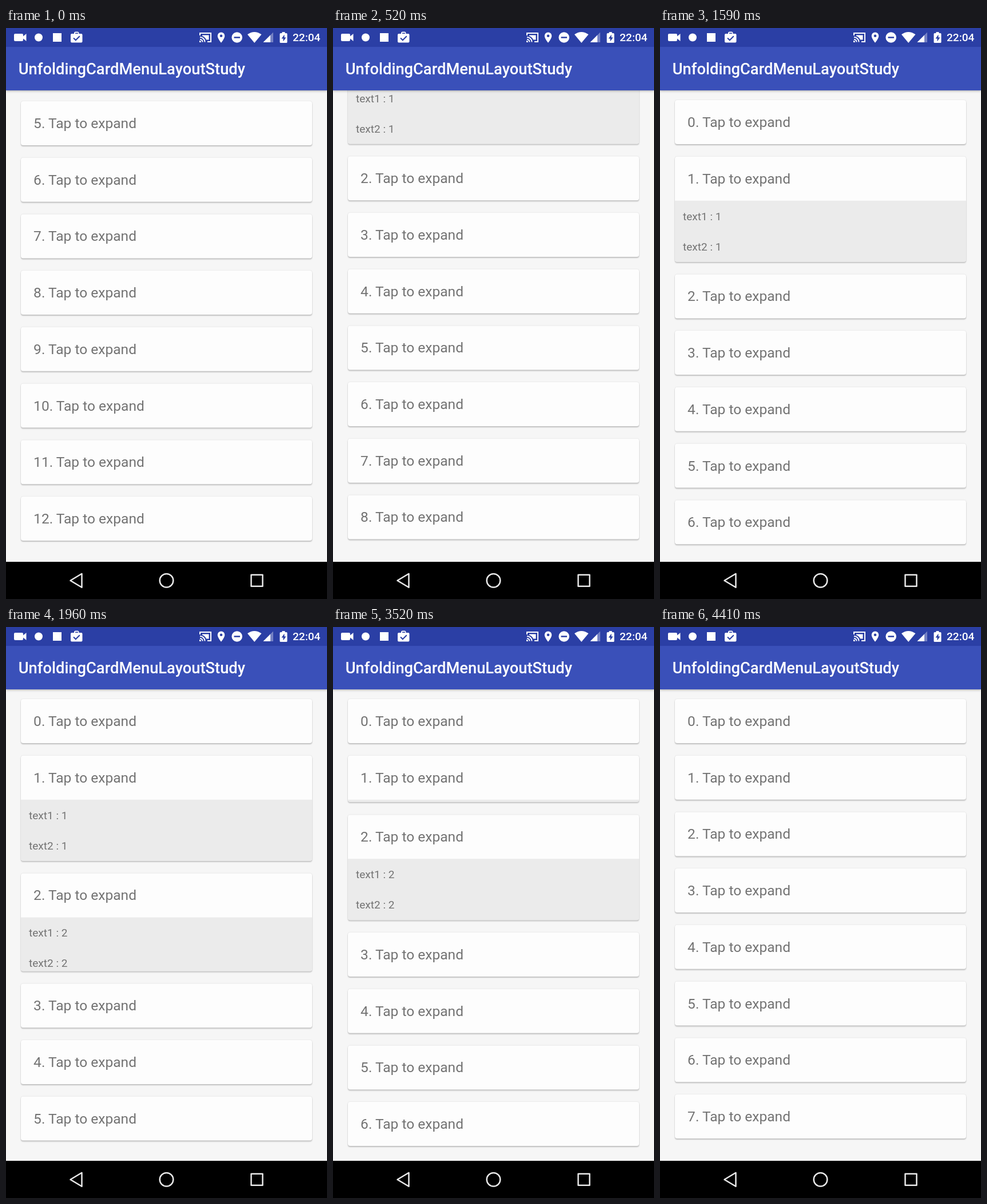
Write an HTML page that moves like this. It is 561 by 998 pixels and loops after 4450 ms.

```html
<!DOCTYPE html>
<html lang="en">
<head>
<meta charset="utf-8">
<title>Unfolding cards</title>
<style>
  html, body { margin: 0; width: 100%; height: 100%; overflow: hidden; background: #f6f6f6; }
  body { position: relative; font-family: Roboto, "Open Sans", sans-serif; }
  .bar { position: absolute; left: 0; width: 561px; }
  #status { top: 0; height: 33px; background: #2b3fa5; }
  #tools {
    top: 33px; height: 76px; background: #3a50b9; box-shadow: 0 1px 4px rgba(0, 0, 0, .32);
    color: #fff; font-size: 27.3px; font-weight: 500; line-height: 78px; text-indent: 21.8px;
    white-space: nowrap;
  }
  #nav { top: 932.5px; height: 65.5px; background: #000; }
  #clock {
    position: absolute; left: 501px; top: 0; color: #fff;
    font-size: 19.1px; font-weight: 500; line-height: 34px;
  }
  svg { position: absolute; left: 0; top: 0; }
  #list { position: absolute; left: 0; top: 109px; width: 561px; height: 801.5px; overflow: hidden; }
  .card {
    position: absolute; left: 26.3px; top: 0; width: 508.4px; border-radius: 4px;
    background: #fdfdfd; color: #737373; white-space: nowrap;
    box-shadow: 0 2px 2px rgba(0, 0, 0, .2), 0 0 2px rgba(0, 0, 0, .14);
  }
  .head { height: 76.5px; line-height: 78px; font-size: 24.54px; padding-left: 21.8px; }
  .more { height: 0; overflow: hidden; background: #ebebeb; border-radius: 0 0 4px 4px; }
  .more div { height: 53.5px; line-height: 55px; font-size: 19.1px; padding-left: 13.6px; }
</style>
</head>
<body>
<div id="list">
  <svg id="glow" width="561" height="120" style="z-index:1">
    <ellipse cx="280.5" rx="841.5" fill="#3f51b5"/>
  </svg>
</div>
<div id="tools" class="bar">UnfoldingCardMenuLayoutStudy</div>
<div id="status" class="bar">
  <svg width="561" height="33" fill="#fff">
    <path d="M16 10h12q2 0 2 2v2.6l5.500-4.600v13l-5.500-4.600v2.600q0 2-2 2h-12q-2 0-2-2v-9q0-2 2-2z"/>
    <circle cx="57" cy="16.500" r="7"/>
    <rect x="82" y="9" width="15" height="15"/>
    <path fill-rule="evenodd" d="M115 10h4v-1q0-2.500 2.500-2.500h3.500q2.500 0 2.500 2.500v1h4q2 0 2 2v11.500q0 2-2 2h-16.500q-2 0-2-2V12q0-2 2-2zm6 0h5v-1.500h-5z"/>
    <path d="M118 17.500l3.800 3.800 7-7" fill="none" stroke="#2b3fa5" stroke-width="2"/>
    <g fill="none" stroke="#fff" stroke-width="2">
      <path d="M339 13V9h19v15h-6M339 16a8.500 8.500 0 0 1 8.500 8.500M339 20a4.500 4.500 0 0 1 4.500 4.500"/>
      <path d="M343 12.500h11.500v8h-4.500q-2-5-7-6.500z" fill="#fff" stroke="none"/>
    </g>
    <path d="M338 22a3 3 0 0 1 3 3h-3z"/>
    <path fill-rule="evenodd" d="M376 7.500a6.300 6.300 0 0 1 6.300 6.300c0 4.700-6.300 12-6.300 12s-6.300-7.300-6.300-12a6.300 6.300 0 0 1 6.300-6.300zm0 4a2.300 2.300 0 1 0 .01 0z"/>
    <circle cx="403.700" cy="16.500" r="9.300"/>
    <path d="M398.500 15.300h10.500v2.500h-10.500z" fill="#2b3fa5"/>
    <path d="M422 11.300q12-8.500 24.500 0L434.200 26z"/>
    <path d="M467 7.500V25h-17.500z" opacity=".35"/>
    <path d="M462 12.500V25h-12.500z"/>
    <path d="M482.500 7h5v2h2.500q1.500 0 1.500 1.500v14q0 1.500-1.500 1.500h-10q-1.500 0-1.500-1.500v-14q0-1.500 1.500-1.500h2.500z"/>
    <path d="M486.500 11.500l-5 7h3v5l5-7h-3z" fill="#2b3fa5"/>
  </svg>
  <div id="clock">22:04</div>
</div>
<div id="nav" class="bar">
  <svg width="561" height="66" fill="none" stroke="#e9e9e9" stroke-width="2.500" stroke-linejoin="round">
    <path d="M132.500 20.800v24L112.500 32.800z"/>
    <circle cx="280.500" cy="32.800" r="11.800"/>
    <rect x="428.500" y="22.800" width="20" height="20"/>
  </svg>
</div>
<script>
const LOOP = 4450, PITCH = 98.7, FIRST = 17, BODY = 107, COUNT = 13;
const FOLD = 350, OPEN_2 = 1690, CLOSE_1 = 3219, CLOSE_2 = 3980;
const GLOW = { start: 645, grow: 215, fade: 640, height: 112.7, radius: 841.5 };

// [time, pixels still to scroll]
const SCROLL = [[40, 598.5], [120, 593], [200, 577], [300, 541.5], [360, 479], [420, 374], [645, 0]];

const list = document.getElementById('list');
const glow = document.querySelector('#glow ellipse');

const clamp = x => Math.min(1, Math.max(0, x));
const ease = x => (1 - Math.cos(Math.PI * clamp(x))) / 2;
const slowDown = x => 1 - (1 - clamp(x)) ** 2;

function add(parent, className, text = '') {
  const el = document.createElement('div');
  el.className = className;
  el.textContent = text;
  return parent.appendChild(el);
}

const cards = Array.from({ length: COUNT }, (_, i) => {
  const card = add(list, 'card');
  add(card, 'head', i + '. Tap to expand');
  const more = add(card, 'more');
  for (const n of [1, 2]) add(more, '', `text${n} : ${i}`);
  return { card, more };
});

function track(points, t) {
  if (t <= points[0][0]) return points[0][1];
  for (let i = 1; i < points.length; i++) {
    const [t0, a] = points[i - 1], [t1, b] = points[i];
    if (t < t1) return a + (b - a) * (t - t0) / (t1 - t0);
  }
  return points[points.length - 1][1];
}

function openness(i, t) {
  if (i === 1) return 1 - ease((t - CLOSE_1) / FOLD);
  if (i === 2) return ease((t - OPEN_2) / FOLD) - ease((t - CLOSE_2) / FOLD);
  return 0;
}

function drawGlow(t) {
  const up = slowDown((t - GLOW.start) / GLOW.grow);
  const down = slowDown((t - GLOW.start - GLOW.grow) / GLOW.fade);
  const scale = up * (1 - down);
  const alpha = t < GLOW.start ? 0 : (0.14 + 0.13 * up) * (1 - down);
  glow.setAttribute('cy', (GLOW.height - GLOW.radius) * scale);
  glow.setAttribute('ry', GLOW.radius * scale);
  glow.setAttribute('opacity', alpha);
}

function draw(t) {
  let y = FIRST - track(SCROLL, t);
  cards.forEach(({ card, more }, i) => {
    const extra = BODY * openness(i, t);
    card.style.transform = `translateY(${y.toFixed(2)}px)`;
    more.style.height = extra.toFixed(2) + 'px';
    y += PITCH + extra;
  });
  drawGlow(t);
}

const begin = performance.now();
function tick() {
  draw((performance.now() - begin) % LOOP);
  requestAnimationFrame(tick);
}
draw(0);
requestAnimationFrame(tick);
</script>
</body>
</html>
```
